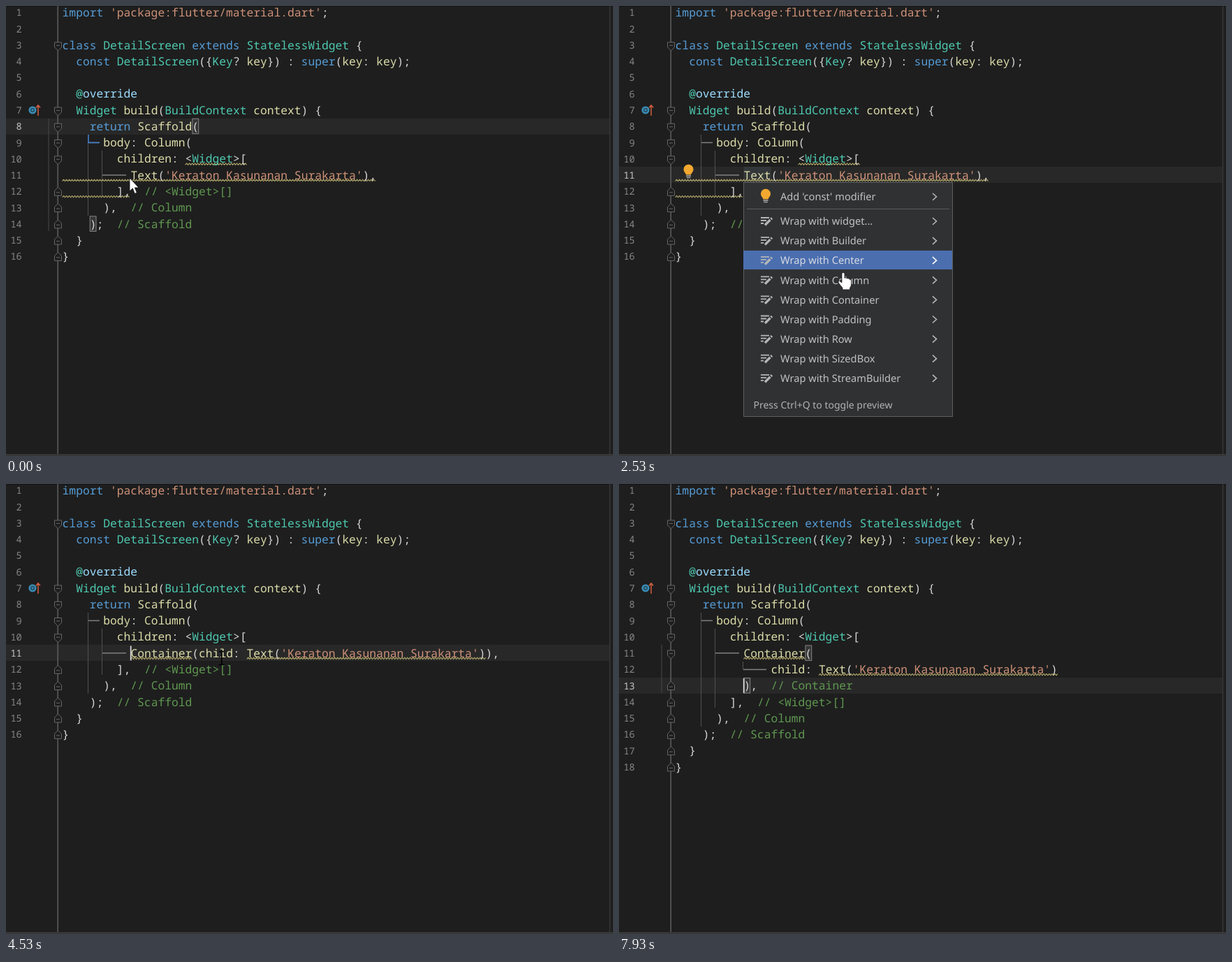
An HTML page that plays this animation: 869 by 644 pixels, repeating every 7.99 s.

```html
<!DOCTYPE html>
<html lang="en">
<head>
<meta charset="utf-8">
<title>Wrap with Container</title>
<style>
  html, body { margin: 0; width: 100%; height: 100%; overflow: hidden; background: #1e1e1e; }
  svg { display: block; width: 869px; height: 644px; }
  text { white-space: pre; text-rendering: geometricPrecision; }
  .code { font: 16.3px "Noto Sans Mono", monospace; }
  .num { font: 13.6px "Noto Sans Mono", monospace; text-anchor: end; }
  .item { font: 14.65px "Noto Sans", sans-serif; fill: #bfc1c3; }
  .hint { font: 14px "Noto Sans", sans-serif; fill: #b0b2b4; }
</style>
</head>
<body>
<svg viewBox="0 0 869 644">
  <defs>
    <g id="bulb">
      <path d="M-3.6 5.5C-4 3-7 1.500-7-2.200A7 7 0 0 1 7-2.200C7 1.500 4 3 3.600 5.500Z" fill="#f2a830"/>
      <path d="M-3.500 7.200H3.500M-2.800 9.600H2.800" stroke="#b4b4b4" stroke-width="1.4"/>
    </g>
    <g id="edit" fill="none" stroke="#b4b6b8" stroke-width="1.8">
      <path d="M-8-5H4M-8-1H0M-8 3H-4"/>
      <path d="M-2 5.500L5.500-2" stroke-width="3.4"/>
      <path d="M6.500-3L8-4.500" stroke-width="3.4"/>
    </g>
    <g id="down" fill="#1e1e1e" stroke="#666">
      <path d="M-5-5.500H5V1.500L0 6.500L-5 1.500Z"/><path d="M-2.500-1H2.500"/>
    </g>
    <g id="up" fill="#1e1e1e" stroke="#666">
      <path d="M-5 6H5V-1L0-6L-5-1Z"/><path d="M-2.500 1.500H2.500"/>
    </g>
    <path id="arrow" d="M0 0V19L4.300 15L7.300 22.500L10.400 21.200L7.400 14H13Z" fill="#fff" stroke="#111" stroke-width=".8"/>
    <g id="beam" fill="none" stroke="#000" stroke-width="1.5">
      <path d="M-4-9.500H-1.500L0-8.500L1.500-9.500H4M0-8.500V8.500M-4 9.500H-1.500L0 8.500L1.500 9.500H4"/>
    </g>
    <path id="hand" d="M-2 2Q-2 0 0 0T2 2V8Q4 6.500 5.500 8.500Q7.500 7.500 8.700 9.700Q11.500 9 11.500 12V17Q11.500 20 9.500 22V24.500H-1V22L-6.500 15Q-8 12.500-5.500 12L-2 14.500Z"
      fill="#fff" stroke="#111" stroke-width=".7"/>
  </defs>
  <rect width="869" height="644" fill="#1e1e1e"/>
  <g id="scene"></g>
  <use id="mouse"/>
</svg>
<script>
const LOOP = 7990, TICK = LOOP / 120;
const CH = 9.78, LEFT = 80.6, PITCH = 23.27, HALF = PITCH / 2;
const scene = document.getElementById('scene');
const mouse = document.getElementById('mouse');

const colX = c => LEFT + c * CH;
const rowY = n => 9.4 + (n - 1) * PITCH;
const rowTop = n => Math.round(rowY(n) - HALF);
const esc = s => s.replace(/&/g, '&amp;').replace(/</g, '&lt;');

const rect = (x, y, w, h, fill, more = '') =>
  `<rect x="${x}" y="${y}" width="${w}" height="${h}" fill="${fill}" ${more}/>`;
const path = (d, color, width = 1) =>
  `<path d="${d}" fill="none" stroke="${color}" stroke-width="${width}"/>`;
const use = (id, x, y) => `<use href="#${id}" x="${x}" y="${y}"/>`;
const label = (cls, x, y, s, more = '') =>
  `<text class="${cls}" x="${x}" y="${y}" ${more}>${s}</text>`;

// Syntax colours
const TOKENS = /(\/\/.*)|('[^']*')|((?<=@)\w+)|\b(import|class|extends|const|super|return)\b|(@|\b(?:DetailScreen|StatelessWidget|Key|Widget|BuildContext)\b)|([A-Za-z]+)|([^A-Za-z'@\/]+)/g;
const COLORS = ['#5f9850', '#ce9178', '#9cdcfe', '#569cd6', '#4ec9b0', '#dcdcaa', '#d4d4d4'];

const paint = s => [...s.matchAll(TOKENS)].map(m => {
  const kind = m.slice(1).findIndex(Boolean);
  return `<tspan fill="${COLORS[kind]}">${esc(m[0])}</tspan>`;
}).join('');

const HEAD = `import 'package:flutter/material.dart';

class DetailScreen extends StatelessWidget {
  const DetailScreen({Key? key}) : super(key: key);

  @override
  Widget build(BuildContext context) {
    return Scaffold(
      body: Column(
        children: <Widget>[`.split('\n');
const TAIL = `        ],  // <Widget>[]
      ),  // Column
    );  // Scaffold
  }
}`.split('\n');
const TITLE = "Text('Keraton Kasunanan Surakarta')";
const pad = ' '.repeat(10);

function codeLines(stage, tagged) {
  const tag = tagged ? '  // Container' : '';
  const body = [
    [`${pad}${TITLE},`],
    [`${pad}Container(child: ${TITLE}),`],
    [`${pad}Container(`, `${pad}    child: ${TITLE}),${tag}`],
    [`${pad}Container(`, `${pad}    child: ${TITLE}`, `${pad}),${tag}`]
  ][stage];
  return [...HEAD, ...body, ...TAIL];
}

function wave(row, from, to) {
  const y = rowY(row) + 7.4, end = colX(to);
  let d = '', i = 0;
  for (let x = colX(from); x <= end; x += 2) d += `${d ? 'L' : 'M'}${x.toFixed(1)} ${y + (i++ % 2 ? -1.2 : 1.2)}`;
  return path(d, '#aea568', 1.1);
}

function waves(s) {
  if (s.oldWaves) return [[10, 18, 27], [11, 0, s.stage ? 63 : 46], [12, 0, 10]];
  if (s.stage === 1) return [[11, 10, 19], [11, 27, 62]];
  return [[11, 10, 19], [12, 21, 56]];
}

function guides(s, n) {
  const dim = '#505050', lit = '#808080';
  let out = path(`M117.500 ${rowTop(9)}V${rowTop(n - 2)}M137.500 ${rowTop(10)}V${rowTop(n - 3) - 4}`, dim)
    + path('M118 195.500H134M138 242H172', lit, 1.3);
  if (s.stage > 1) out += path(`M177.500 ${rowTop(12)}V265.500`, dim) + path('M178 265.500H211', lit, 1.3);
  if (!s.clicked) out += path(`M118 ${rowTop(9)}V195.500H134`, '#3f7fd0', 1.5);
  return out;
}

function gutter(s, n) {
  let out = path('M74.200 0V641', '#5a5a5a', 1.6);
  const starts = [3, 7, 8, 9, 10];
  if (s.stage > 1) starts.push(11);
  starts.forEach(r => out += use('down', 74.5, rowY(r) + 1.5));
  for (let r = n - (s.stage > 1 ? 5 : 4); r <= n; r++) out += use('up', 74.5, rowY(r));
  for (let r = 1; r <= n; r++)
    out += label('num', 22.7, rowY(r) + 5, r, `fill="${r === s.row ? '#c6c6c6' : '#868686'}"`);
  out += '<circle cx="38" cy="149" r="5.600" fill="#3a8db5"/><circle cx="38" cy="149" r="2.300" fill="#3a8db5" stroke="#1e3e50" stroke-width="1.200"/>';
  return out + path('M46 157V142M43 145.500L46 142L49 145.500', '#d2603f', 1.5);
}

const ITEMS = ["Add 'const' modifier", 'Wrap with widget...',
  ...['Builder', 'Center', 'Column', 'Container', 'Padding', 'Row', 'SizedBox', 'StreamBuilder'].map(w => 'Wrap with ' + w)];
const itemY = i => i ? 308 + 28.1 * (i - 1) : 273;

function menu(hover) {
  let out = rect(178.5, 252.5, 299, 335, '#303133', 'stroke="#5c5e60"');
  out += rect(178, Math.round(itemY(hover) - 14), 299, 27, '#4b6eaf');
  out += path('M183 290.500H473', '#5a5c5e');
  ITEMS.forEach((s, i) => {
    const y = itemY(i);
    out += i ? use('edit', 211, y) : use('bulb', 210, 271);
    out += label('item', 231, y + 5.2, s, i === hover ? 'style="fill:#d6dae2"' : '');
    out += path(`M449 ${y - 5}L454.500 ${y}L449 ${y + 5}`, i === hover ? '#fff' : '#b4b6b8', 1.6);
  });
  return out + label('hint', 192.5, 576, 'Press Ctrl+Q to toggle preview');
}

function draw(s) {
  const lines = codeLines(s.stage, s.tagged), n = lines.length;
  let out = rect(0, rowTop(s.row), 864, 23, '#282828');
  out += path('M0 .5H869', '#131313') + path('M864.500 0V642', '#383838', 1.5) + path('M0 642.500H869', '#414141', 2);
  if (s.focus) out += rect(colX(10), rowTop(11), 4 * CH, 22, '#343739');
  out += gutter(s, n) + guides(s, n);
  const [a, b] = s.pair;
  if (a && a[0] !== b[0]) out += path(`M61 ${rowTop(a[0])}V${rowTop(b[0]) + 22}`, '#484848');
  s.pair.forEach(([r, c]) =>
    out += rect(colX(c) + .5, rowY(r) - 11, CH - 1, 21.5, '#363636', 'stroke="#858585"'));
  waves(s).forEach(w => out += wave(...w));
  lines.forEach((l, i) => {
    const text = l.trimStart();
    if (text) out += label('code', colX(l.length - text.length), rowY(i + 1) + 5.6, paint(text));
  });
  if (s.caret >= 0) out += rect(colX(s.caret) - .6, rowY(s.row) - 10.5, 1.8, 21, '#d8d8d8');
  if (s.bulb) out += use('bulb', 99.5, 236);
  if (s.hover >= 0) out += menu(s.hover);
  scene.innerHTML = out;
}

// Pointer moves: start, end, easing, then a curve of three points
const smooth = p => p * p * (3 - 2 * p);
const settle = p => 1 - (1 - p) ** 2;
const MOVES = [
  [70, 530, smooth, 177, 246, 213, 258, 249, 271],
  [2150, 2870, settle, 249, 271, 277, 338, 351, 414],
  [3930, 4730, smooth, 351, 414, 395, 243, 276, 246],
  [5400, 6200, smooth, 276, 246, 455, 250, 634, 262],
  [6200, 6330, smooth, 634, 262, 632, 265, 630, 267]
];

function pointer(t) {
  const [t0, t1, ease, x0, y0, cx, cy, x1, y1] = MOVES.findLast(m => t >= m[0]) || MOVES[0];
  const e = ease(Math.min(1, Math.max(0, (t - t0) / (t1 - t0))));
  const mix = (a, b, c) => a * (1 - e) ** 2 + 2 * b * e * (1 - e) + c * e * e;
  return [mix(x0, cx, x1), mix(y0, cy, y1)];
}

function hovered(t) {
  if (t < 2200) return 0;
  const y = pointer(t - TICK)[1];
  return y < 290 ? 0 : Math.max(1, Math.round((y - 308) / 28.1) + 1);
}

const pick = (t, steps) => steps.findLast(s => t >= s[0])[1];

function stateAt(t, tick) {
  return {
    stage: pick(t, [[0, 0], [3670, 1], [5470, 2], [6730, 3]]),
    row: pick(t, [[0, 8], [130, 11], [5470, 12], [6730, 13]]),
    caret: pick(t, [[0, -1], [3670, 10], [4870, 20], [5470, 14], [6470, 56], [6730, 10]]),
    pair: pick(t, [[0, [[8, 19], [14, 4]]], [130, []], [4870, [[11, 19], [11, 62]]],
      [5470, []], [6470, [[12, 25], [12, 55]]], [6730, [[11, 19], [13, 10]]]]),
    clicked: t >= 130,
    focus: t >= 1330 && t < 3670,
    bulb: (t >= 1330 && t < 1730) || (t >= 1870 && t < 3670),
    oldWaves: t < 4200,
    tagged: t >= 5800,
    hover: t >= 1870 && t < 3600 ? hovered(tick) : -1
  };
}

let start, last;
function frame(now) {
  start ??= now;
  const t = (now - start) % LOOP + 4;
  const tick = Math.floor(t / TICK) * TICK + 4;
  const s = stateAt(t, tick), key = JSON.stringify(s);
  if (key !== last) draw(s);
  last = key;
  const [x, y] = pointer(tick);
  const shape = pick(t, [[0, 'arrow'], [130, 'beam'], [2200, 'hand'], [4000, 'beam']]);
  mouse.setAttribute('href', '#' + shape);
  mouse.setAttribute('transform', `translate(${x.toFixed(1)} ${y.toFixed(1)})`);
  mouse.setAttribute('visibility', t < 6730 ? 'visible' : 'hidden');
  requestAnimationFrame(frame);
}
requestAnimationFrame(frame);
</script>
</body>
</html>
```
